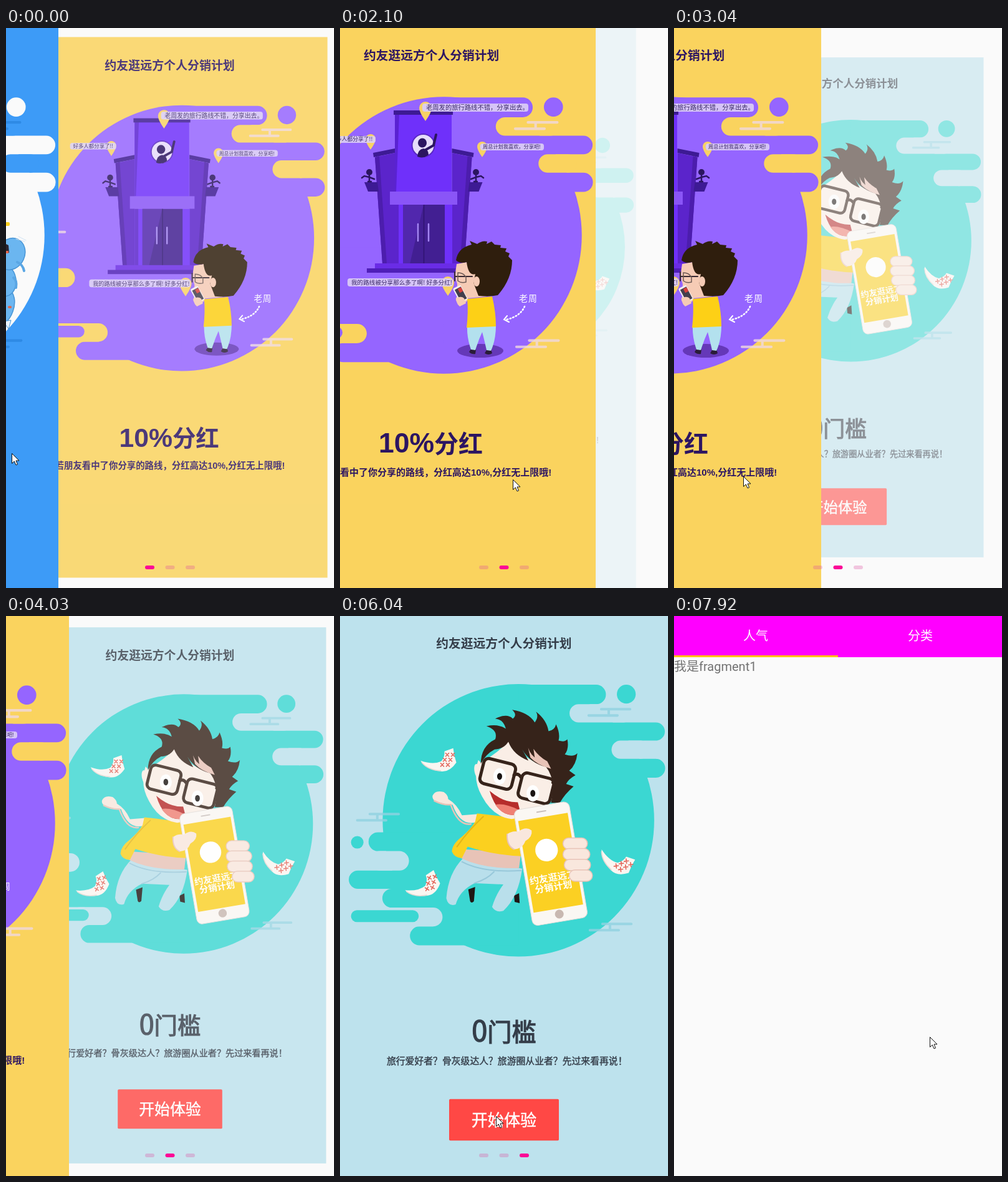
An HTML page for the animation above (8000 ms loop, 526 by 897 pixels).

```html
<!DOCTYPE html>
<html lang="zh-CN">
<head>
<meta charset="utf-8">
<style>
html,body{margin:0;width:100%;height:100%;overflow:hidden;background:#fafafa}
svg{display:block;width:100%;height:100%}
text{font-family:"Noto Sans CJK SC","Noto Sans CJK",sans-serif}
.mix{font-family:"Liberation Sans","Noto Sans CJK SC","Noto Sans CJK",sans-serif}
</style>
</head>
<body>
<svg id="stage" viewBox="0 0 526 897"></svg>
<script>
const LOOP = 8000, W = 526, MID = 447.5;
const BRAND = '约友逛远方', TITLE = BRAND + '个人分销计划';

const el = (tag, attrs, body = '') =>
  `<${tag} ${Object.entries(attrs).map(([k, v]) => `${k}="${v}"`).join(' ')}>${body}</${tag}>`;
const path = (d, fill, more = {}) => el('path', {d, fill, ...more});
const line = (d, stroke, width, more = {}) =>
  path(d, 'none', {stroke, 'stroke-width': width, 'stroke-linecap': 'round', ...more});
const rect = (x, y, width, height, fill, rx = 0, more = {}) => el('rect', {x, y, width, height, fill, rx, ...more});
const oval = (cx, cy, rx, ry, fill, more = {}) => el('ellipse', {cx, cy, rx, ry, fill, ...more});
const text = (x, y, size, fill, s, more = {}) => el('text', {x, y, 'font-size': size, fill, ...more}, s);
const group = (transform, ...parts) => el('g', {transform}, parts.join(''));

const sheet = (fill, id) => rect(0, -3.5, W, 902, fill, 0, {id});

// circle with cloud-like bands, shared by all pages
function cloud(fill, back, wisp) {
  const wisps = [[396, 151], [398, 493], [27, 318]].map(([x, y]) =>
    line(`M${x + 22} ${y}h46M${x + 2} ${y + 10}h46M${x + 34} ${y}v10`, wisp, 4, {'stroke-opacity': .8})).join('');
  return oval(286, 328, 216.5, 217, fill) +
    path('M286 112H410a15 15 0 0 1 0 31H382a14.5 14.5 0 0 0 0 29H505a14 14 0 0 1 0 29H449a14.5 14.5 0 0 0 0 29H505a15 15 0 0 1 0 30H286z', fill) +
    path('M286 347H62a15 15 0 0 0 0 30H96a15.5 15.5 0 0 1 0 31H30a14.5 14.5 0 0 0 0 29H84a15 15 0 0 0 0 30H150a15 15 0 0 1 0 30H128a15 15 0 0 0 0 30H286z', fill) +
    rect(367.5, 143, 100, 29, back, 14.5) + rect(434.5, 201, 60, 29, back, 14.5) +
    rect(50, 377, 61.5, 31, back, 15.5) + rect(98, 467, 67, 30, back, 15) +
    rect(19, 471, 108, 19, fill, 9.5) + oval(458, 127, 15, 15, fill) + oval(29, 363, 10, 10, fill) + wisps;
}
const wide = art => group('translate(282.5 332) scale(1.0218) translate(-286 -328)', art);

function bluePage() {
  const back = '#3d9bf7';
  const bird = (x, y, rx, ry, turn) => oval(x, y, rx, ry, '#6bb6f0',
    {stroke: '#4795d6', 'stroke-width': 1.5, transform: `rotate(${turn} ${x} ${y})`});
  return sheet(back) + wide(cloud('#fafafa', back, '#2b86e2')) + group('translate(442 0)',
    rect(-10, 311, 16, 6, '#fbd020', 2),
    bird(-6, 448, 18, 30, 20), bird(-4, 404, 20, 26, -10), bird(8, 362, 22, 26, 25),
    path('M-4 470L8 468 4 482z', '#eaf4fc', {stroke: '#4795d6'}),
    line('M18 375q9 4 11 14M12 400q6 4 4 16', '#5aa6e4', 4),
    path('M-4 344L4 348 5 360-4 358z', '#2b2430'), rect(-4, 357, 8, 4, '#e0674f'), oval(6, 447, 3, 2, '#e0674f'),
    line('M16 338l14 4M20 334l12 6', '#cfe3f4', 1));
}

function building() {
  const dark = '#3d1a94', side = '#5b24cb', front = '#6f30fa';
  const wing = path('M53 200L88 193V200L54 207z', dark) + path('M56 207L88 200V378H68z', side) +
    path('M56 207L63 205 75 378H68z', '#4c1dad') + path('M39 247H60L62 262H45z', dark);
  const guard = line('M47 236v10M47 239l-8 -2 -4 3M47 239l8 3M45 246h5', '#2b1560', 2.5) + oval(47, 231, 5, 5, '#2b1560');
  return wing + group('translate(267.5 0) scale(-1 1)', wing) + guard + group('translate(265 0) scale(-1 1)', guard) +
    rect(88, 138, 91, 140, front) + path('M88 138h7l-5 124h-2z', '#5a22d2') + rect(86, 132, 95, 7, dark) +
    rect(88, 283, 92, 95, front) + rect(88, 283, 6, 95, side) + rect(101, 283, 67, 95, '#421f92') +
    path('M101 283h33L112 378H101z', '#5127ad') + line('M134.500 283V378', '#2f1470', 1.5) +
    line('M125 314V341M142 314V341', '#a486f2', 2.5) +
    rect(80, 262, 108, 21, '#8a55f7') + rect(56, 377, 135, 9, '#6a2ce6') + rect(43, 385, 170, 7, '#4f1fb8') +
    oval(133.500, 188, 18, 18, '#e6dcfa', {stroke: '#5a28c4', 'stroke-width': 2}) +
    line('M134 196L135 205M134 197L150 188 154 171', '#2b1560', 4) +
    path('M124 206q1-12 10-13 8 2 8 10-9 7-18 3z', '#2b1560') + oval(132, 184, 7, 7.5, '#2b1560');
}

function pin(x, y, r) {
  return path(`M${x - r} ${y}a${r} ${r} 0 0 1 ${2 * r} 0q0 ${r * .7} ${-r} ${r * 2.1}q${-r} ${-r * 1.4} ${-r} ${-r * 2.1}z`, '#f9d264') +
    oval(x, y, r * .45, r * .45, '#c9b4e8');
}
const note = (x, y, w, h, tx, size, s) =>
  rect(x, y, w, h, '#dccff6', 4, {opacity: .9}) + text(tx, y + h - 2.6, size, '#3b2a68', s);

function backBoy() {
  return oval(225, 517, 37, 11, '#6538b8') +
    path('M207 519q2-5 7-6l4 2-1 7q-6 1-10-3zM232 521l4-7 6 1 2 6q-6 4-12 0z', '#2a1c38') +
    path('M204 476H250Q250 500 242 517L235 516Q231 498 228 487Q222 500 217 516L210 515Q203 495 204 476z', '#b3e1ee') +
    path('M187 378Q183 398 188 410Q186 428 204 433L235 430 232 370z', '#f6cbb5') +
    path('M206 434Q198 446 188 440Q183 434 189 429L204 432z', '#f6cbb5') +
    path('M204 434L244 430Q250 455 250 478L203 480Q206 455 204 434z', '#fdd016') +
    path('M186 372Q189 352 211 347L208 341 220 346Q228 340 236 342L235 346 243 342 248 347 258 348 257 352 267 353 265 358 272 361 270 366 276 372Q276 402 253 428Q240 431 222 429L214 408 217 394Q206 398 203 375Q192 378 186 372z', '#2f1e0d') +
    oval(219, 406, 5, 8, '#f6cbb5') + line('M184 391V405M184 398H212', '#3a2a33', 2) +
    line('M189 392q9 0 13 7v8q-8 2-13-2z', '#6e5a55', 1.5) +
    group('translate(193 426) rotate(-28)', rect(-7, -13, 14, 26, '#f4eef0', 2), rect(-5, -10, 11, 21, '#433f4d'), rect(0, -9, 6, 7, '#d8403c')) +
    path('M188 432q7-3 11 1l3 8-10 5q-7-5-4-14z', '#f6cbb5');
}

function yellowPage() {
  const back = '#fad35e', ink = '#2c1562', bold = {'font-weight': 700, class: 'mix'};
  return sheet(back) + wide(cloud('#9565ff', back, '#f0d9e0')) + group('translate(116 0)',
    building(),
    pin(137, 128, 10), note(132, 121, 170, 13, 138, 10.3, '老周发的旅行路线不错，分享出去。'),
    pin(49, 178, 8), note(-20, 173, 77, 11, -15, 8.8, '好多人都分享了!!'),
    pin(228, 190, 8), note(225, 185, 102, 11, 229, 8.2, '周总计划我喜欢，分享吧!'),
    pin(173, 408, 10), note(12, 401, 169, 13, 18, 9.6, '我的路线被分享那么多了啊! 好多分红!'),
    backBoy(),
    text(287, 438, 14, '#fff', '老周', {'letter-spacing': 1}),
    line('M296 446Q289 462 267 467', '#fff', 2.6, {'stroke-dasharray': '1.5 3.5'}),
    line('M268 461L263 467 271 471', '#fff', 2),
    text(38, 51, 19.75, ink, TITLE, bold),
    text(62, 680, 39, ink, '<tspan font-size="44.500">10%</tspan>分红', bold),
    text(-45, 717, 15, ink, '若朋友看中了你分享的路线，分红高达10%,分红无上限哦!', bold));
}

function ticket(x, y, turn) {
  let marks = '';
  for (let i = 0; i < 6; i++) {
    const row = i >> 1;
    marks += `M${(i % 2) * 9 + 10 - row * 4} ${row * 8 - 11}l5 5m0-5l-5 5`;
  }
  return group(`translate(${x} ${y}) rotate(${turn})`,
    path('M-30 1Q-10 8 3 2Q9-5 8-14L22-19Q23-8 27 4Q16 20 2 18Q-22 15-30 1z', '#faf6f1'),
    line('M-28 4Q-18 16 2 17', '#e6d8d2', 1.5), line(marks, '#e2655a', 1.6));
}

function jumper() {
  const skin = '#f9e7dd', face = '#faeee6', shade = '#e8c3b7', brown = '#36231a';
  const lens = (x, y) => rect(-26, -20.5, 52, 41, face, 8,
    {stroke: brown, 'stroke-width': 5, transform: `translate(${x} ${y}) rotate(14)`});
  const eye = (x, y) => oval(x, y, 10, 13, '#fff') + oval(x, y, 4, 5.5, '#1a1412');
  return path('M206 438l11-4-2 23q-4 4-6 0zM279 448l8-4 1 16-8-2z', '#1f1715') +
    path('M198 388Q174 412 171 452Q174 466 186 462Q192 440 216 428L262 430Q250 446 244 466Q250 476 262 472Q286 450 292 405z', '#b9dfeb') +
    line('M196 394Q230 412 290 408M216 428Q236 422 247 410', '#98c8da', 2) +
    path('M222 330Q194 340 181 303Q172 304 162 300Q148 298 149 289Q153 279 167 283Q174 288 174 294Q188 302 196 320L222 318z', skin) +
    line('M152 297Q166 304 178 303Q190 337 210 334', shade, 2.5) +
    path('M197 374L290 380 287 404Q232 406 194 388z', shade) +
    path('M220 317Q250 320 285 325L292 385Q248 384 205 370L196 388Q184 388 180 378Q180 366 196 354Q212 340 217 330z', '#fbd01f') +
    line('M230 322Q206 344 188 370', '#e3b518', 2) +
    oval(221, 250, 5, 12, face, {transform: 'rotate(-12 221 250)'}) +
    path('M222 232Q212 262 228 290Q245 322 275 326Q325 320 342 292L348 262Q345 250 330 242Q290 230 272 198Q262 215 226 236z', face) +
    path('M226 238Q226 210 249 199Q254 184 235 178Q254 174 266 182Q262 167 249 166Q268 157 277 166Q285 160 276 152Q302 156 312 172Q319 163 314 155Q331 168 334 186Q344 184 346 175Q353 190 350 201Q360 204 364 199Q367 214 360 223Q374 228 380 221Q378 240 367 249L377 256Q366 262 362 270L374 274Q360 286 352 300L338 300Q346 262 330 243Q304 236 292 215L302 233Q278 224 270 203Q262 215 248 215Q234 222 226 238z', brown) +
    path('M300 206q2 14 12 22l-2-14q8 12 22 20l6 12q-22-6-33-18z', shade) +
    path('M240 281Q262 300 285 299L290 318Q254 328 240 281z', '#b62c2b') + path('M249 303Q264 300 288 312L290 318Q264 325 249 303z', '#ef8074') +
    lens(253, 254) + lens(314, 277) + line('M279 256Q285 252 290 259M341 268L350 262', brown, 5) +
    eye(256, 258) + eye(309, 285);
}

function phone() {
  const fingers = [[357, 356, 39], [357, 373, 43], [359, 390, 42], [367, 407, 37]].map(([x, y, w]) =>
    rect(x, y, w, 18, '#f9e7dd', 9, {stroke: '#e8c3b7', 'stroke-width': 1.5})).join('');
  const print = {'font-weight': 700};
  return group('translate(337.500 396.500) rotate(-9.6)',
      rect(-44.500, -93, 89, 187, '#faf7f3', 9, {stroke: '#e3dcd8', 'stroke-width': 1}),
      rect(-40, -75, 80, 148, '#fbd023'), line('M-8 -84H6', '#c9bfbb', 2), oval(0, 82, 7, 7, '#c8b8b1'),
      oval(-3, -22, 18, 18, '#fff'),
      text(-38, 28, 15, '#fff', BRAND, print), text(-32, 43, 15, '#fff', '分销计划', print)) +
    fingers +
    path('M268 350Q276 344 286 346Q298 337 307 344Q309 354 297 361Q293 373 279 374Q267 368 268 350z', '#f9e7dd') +
    line('M268 350Q267 368 279 374', '#e8c3b7', 2);
}

function tealPage() {
  const back = '#bde2ed', ink = '#343d49', mid = {'text-anchor': 'middle'};
  const heavier = (color, width) => ({stroke: color, 'stroke-width': width});
  return sheet(back, 'tealBack') + group('translate(263 447.500) scale(1.0057) translate(-263 -447.500)',
    cloud('#3bd7d2', back, '#90d2e2'), ticket(160, 232, 0), ticket(134, 431, -14), ticket(443, 392, 38), jumper(), phone(),
    text(263, 53, 19.65, ink, TITLE, {...mid, 'font-weight': 700}),
    text(263, 680, 39, ink, '<tspan font-size="45">0</tspan>门槛', {...mid, ...heavier(ink, 1.3)}),
    text(76, 716, 14.75, ink, '旅行爱好者？骨灰级达人？旅游圈从业者？先过来看再说！', heavier(ink, .4)),
    rect(175.500, 772, 175, 66, '#ff4845', 2, {id: 'button'}),
    text(263, 815, 26, '#fff', '开始体验', {...mid, ...heavier('#fff', .5)}));
}

function tabsPage() {
  const tab = (x, s) => text(x, 39, 20, '#fff', s, {'text-anchor': 'middle'});
  return rect(0, -5, W, 902, '#fafafa') + rect(0, -5, W, 71, '#f0f') + rect(0, 63, 263, 3, '#ffc000') +
    tab(131, '人气') + tab(395, '分类') +
    text(0, 88, 20, '#737373', '我是<tspan font-family="Roboto, sans-serif">fragment1</tspan>');
}

const layer = (id, body) => el('g', {id}, body);
document.getElementById('stage').innerHTML =
  layer('slides', rect(0, 0, W, 897, '#fafafa') + layer('teal', tealPage()) + layer('yellow', yellowPage()) + layer('blue', bluePage()) +
    [0, 1, 2].map(i => rect(223 + i * 32.5, 861, 15, 6, '', 3, {id: 'dot' + i})).join('')) +
  layer('app', rect(0, 0, W, 897, '#000') + layer('tabs', tabsPage())) +
  layer('mouse', path('M.5.5V16.500L4.300 13 7 19 9.500 18 7 12H12z', '#fff', {stroke: '#111', 'stroke-width': 1}));

const $ = id => document.getElementById(id);
const set = (id, attrs) => { for (const k in attrs) $(id).setAttribute(k, attrs[k]); };

// screen refresh bursts: first, last, count
const bursts = [[150, 1110, 8], [1260, 2220, 8], [2340, 3310, 8], [3470, 4420, 8], [4570, 5510, 8],
  [5650, 6040, 4], [6440, 6440, 1], [6870, 7140, 3], [7410, 7920, 5]];
function refresh(t) {
  let last = 0;
  for (const [a, b, n] of bursts)
    for (let i = 0; i < n; i++) {
      const s = n > 1 ? a + (b - a) * i / (n - 1) : a;
      if (s <= t + 18) last = s;
    }
  return last;
}

function along(keys, t, k = 1) {
  let i = 0;
  while (i < keys.length - 2 && t > keys[i + 1][0]) i++;
  const a = keys[i], b = keys[i + 1];
  const u = Math.min(1, Math.max(0, (t - a[0]) / (b[0] - a[0])));
  return a[k] + (b[k] - a[k]) * u;
}

const blueEdge = [[0, 84], [750, 14], [1000, 0]];
const yellowEdge = [[1450, 526], [2083, 410], [3033, 236], [3310, 200], [4013, 101], [4420, 48], [4973, 12], [5400, 5], [5650, 0]];
const mouseWay = [[0, 9, 681], [150, -20, 690], [900, -20, 710], [1450, 396, 728], [2083, 277, 723], [3033, 111, 718],
  [3700, -20, 716], [5510, -20, 740], [5650, 150, 760], [6040, 250, 801], [7400, 250, 801], [7780, 428, 700], [7920, 410, 674]];
const opening = [[6870, .16], [7005, .74], [7140, 1]];

const zoom = (s, cy) => `translate(263 ${cy}) scale(${s}) translate(-263 ${-cy})`;
const depth = edge => ({transform: zoom(1 - .25 * edge / W, MID), opacity: 1 - edge / W});

function draw(now) {
  const t = refresh(now % LOOP);
  const e1 = along(blueEdge, t), e2 = along(yellowEdge, t);
  set('blue', {transform: `translate(${e1 - W} 0)`});
  set('yellow', e1 > 0 ? depth(e1) : {transform: `translate(${e2 - W} 0)`, opacity: 1});
  set('teal', depth(e2));
  set('tealBack', e2 > 360 ? {y: -300, height: 1500} : {y: -3.5, height: 902});
  set('button', {fill: t >= 6440 ? '#e43f3c' : '#ff4845'});

  const page = t < 800 ? 0 : t < 5500 ? 1 : 2;
  for (let i = 0; i < 3; i++)
    set('dot' + i, i === page ? {fill: '#fb0596', opacity: 1} : {fill: '#de4c9e', opacity: .3});

  const open = along(opening, t);
  set('app', {visibility: t >= 6870 ? 'visible' : 'hidden'});
  set('tabs', {transform: zoom(.8 + .2 * open, 437), opacity: open});
  set('mouse', {transform: `translate(${along(mouseWay, t)} ${along(mouseWay, t, 2)})`});
}

let start;
function tick(now) {
  start ??= now;
  draw(now - start);
  requestAnimationFrame(tick);
}
draw(0);
requestAnimationFrame(tick);
</script>
</body>
</html>
```
